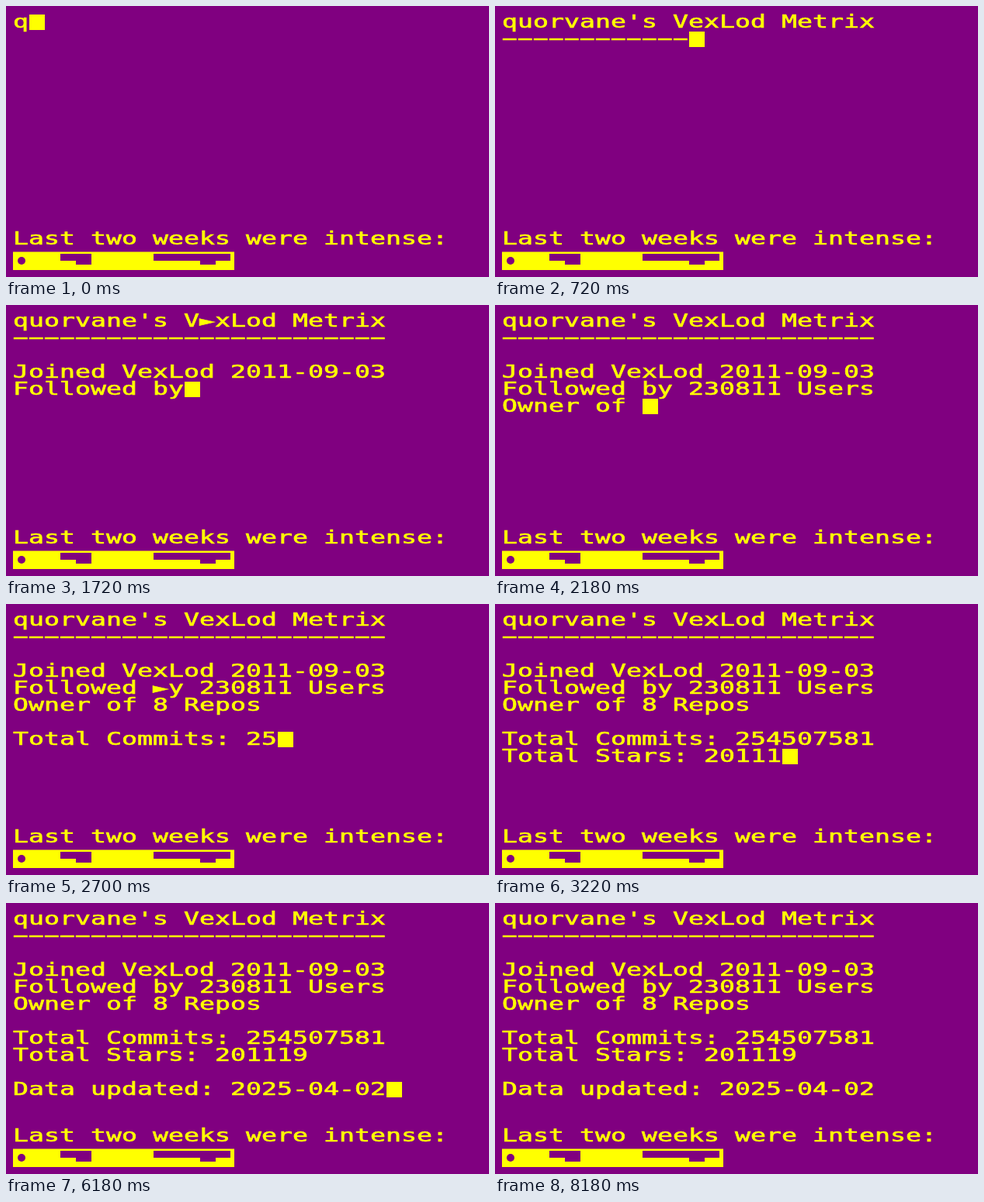
Write an HTML page that moves like this. It is 622 px wide and 350 px high and loops after 8.58 s.

```html
<!DOCTYPE html>
<html lang="en">
<head>
<meta charset="utf-8">
<title>Terminal stats</title>
<style>
  html, body { margin: 0; width: 100%; height: 100%; overflow: hidden; background: #800080; }
  pre {
    position: absolute; left: 9px; margin: 0;
    font: 23px/22px "DejaVu Sans Mono", monospace;
    letter-spacing: calc(20px / 1.44 - 1ch);
    color: #ff0; -webkit-text-stroke: .6px #ff0;
    transform: scaleX(1.44); transform-origin: 0 0;
  }
  #screen { top: 9px; }
  #label { top: 289px; }
  #cursor { position: absolute; width: 20px; height: 20px; background: #ff0; }
  svg { position: absolute; left: 0; top: 0; }
</style>
</head>
<body>
<pre id="screen"></pre>
<pre id="label">Last two weeks were intense:</pre>
<svg width="622" height="350" fill="#800080">
  <path fill="#ff0" d="M9 317.5H294V341H9z"/>
  <circle cx="20" cy="329" r="5"/>
  <path d="M70 320H110V334H90V329H70zM190 320H289V329H270V334H250V329H190z"/>
</svg>
<div id="cursor"></div>
<script>
const LOOP = 8580, STEP = 20, BLINK = 400, BLINK_START = 3780;
const text = [
  "quorvane's VexLod Metrix",
  "\u2212".repeat(24),
  "",
  "Joined VexLod 2011-09-03",
  "Followed by 230811 Users",
  "Owner of 8 Repos",
  "",
  "Total Commits: 254507581",
  "Total Stars: 201119",
  "",
  "Data updated: 2025-04-02"
].join("\n");

// Characters that briefly turn into a symbol
const glitches = [
  { at: 12, from: 1260, to: 1760 },
  { at: 85, from: 2220, to: 2720 }
];

const screenEl = document.getElementById("screen");
const cursorEl = document.getElementById("cursor");

function draw(t) {
  const typed = text.slice(0, Math.floor(t / STEP) + 1);
  const chars = [...typed];
  for (const g of glitches)
    if (t >= g.from && t < g.to) chars[g.at] = "\u25ba";
  screenEl.textContent = chars.join("");

  const rows = typed.split("\n");
  cursorEl.style.left = 10 + 20 * rows.at(-1).length + "px";
  cursorEl.style.top = 11 + 22 * (rows.length - 1) + "px";
  const off = t >= BLINK_START && Math.floor((t - BLINK_START) / BLINK) % 2;
  cursorEl.style.visibility = off ? "hidden" : "visible";
}

const start = performance.now();
function tick() {
  draw((performance.now() - start) % LOOP);
  requestAnimationFrame(tick);
}
tick();
</script>
</body>
</html>
```
